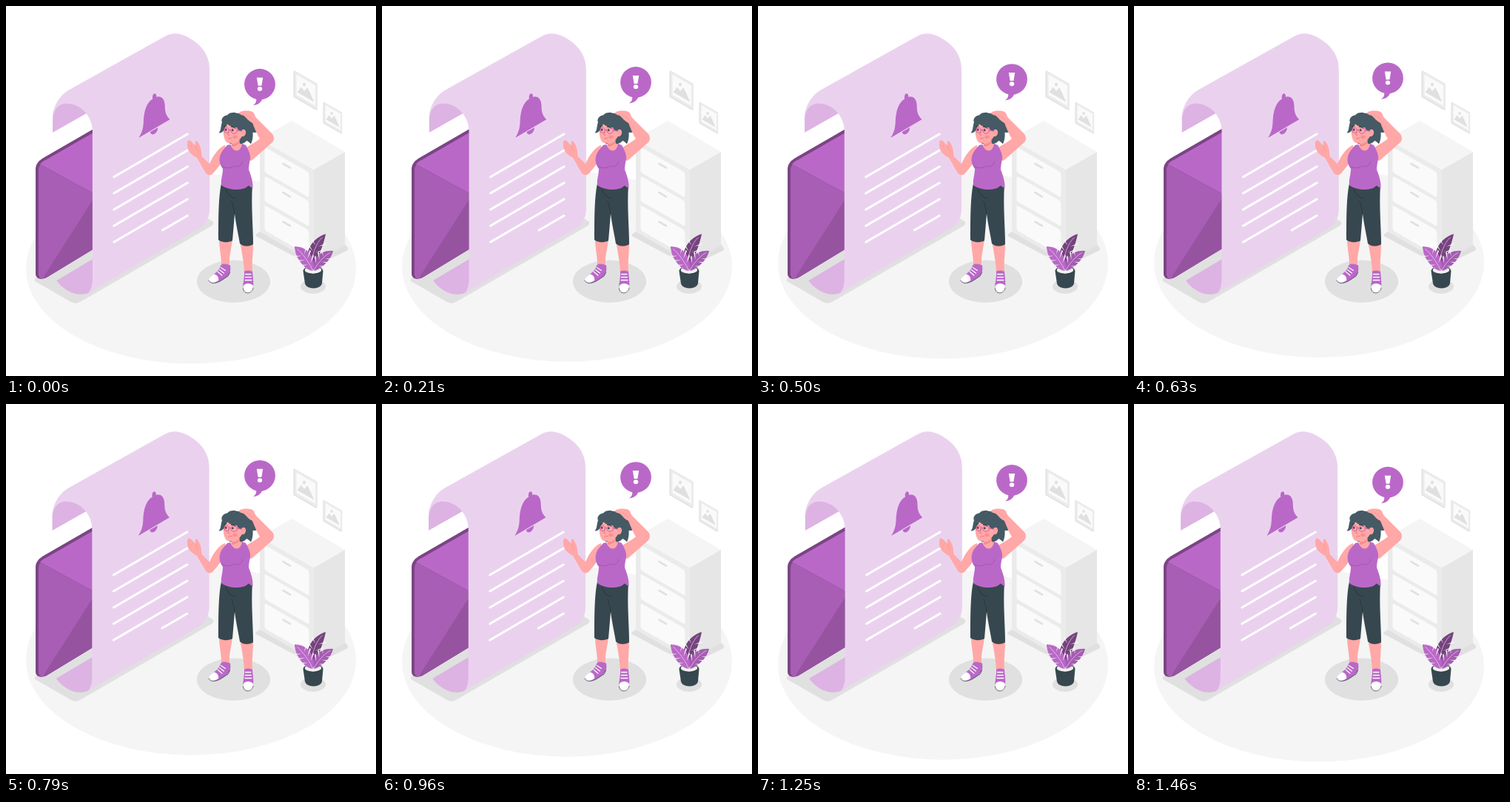
An HTML page with a canvas for the animation above (1.5 s loop, 500 by 500 pixels).

```html
<!DOCTYPE html>
<html lang="en">
<head>
<meta charset="utf-8">
<title>Notification</title>
<style>
  html, body { margin: 0; width: 100%; height: 100%; overflow: hidden; background: #fff; }
  canvas { display: block; width: 500px; height: 500px; }
</style>
</head>
<body>
<canvas id="stage"></canvas>
<script>
const canvas = document.getElementById('stage');
const ctx = canvas.getContext('2d');
const ratio = window.devicePixelRatio || 1;
canvas.width = canvas.height = 500 * ratio;

const LOOP = 1500, STEPS = 36;
const PURPLE = '#ba68c8', DARK = '#37474f', HAIR = '#455a64', SKIN = '#ffa8a7';
const SHADE = '#e0e0e0', FLOOR = '#f5f5f5';

const fill = (color, d) => {
  ctx.fillStyle = color;
  ctx.fill(new Path2D(d));
};
const stroke = (color, width, d) => {
  ctx.strokeStyle = color;
  ctx.lineWidth = width;
  ctx.stroke(new Path2D(d));
};
const ellipse = (color, x, y, rx, ry = rx, turn = 0) => {
  ctx.fillStyle = color;
  ctx.beginPath();
  ctx.ellipse(x, y, rx, ry, turn, 0, Math.PI * 2);
  ctx.fill();
};
const shifted = (dx, dy, draw) => {
  ctx.save();
  ctx.translate(dx, dy);
  draw();
  ctx.restore();
};

// Horizontal shake, one stop for every tenth of the loop.
const SHAKE = [0, -1, 2, -4, 4, -4, 4, -4, 2, -1, 0];
const shakeAt = p => {
  const i = Math.min(9, Math.floor(p * 10));
  return SHAKE[i] + (SHAKE[i + 1] - SHAKE[i]) * (p * 10 - i);
};
const floatAt = p => -10 * (1 - Math.abs(1 - 2 * p));

function drawPicture(x, y, scale) {
  ctx.save();
  ctx.translate(x, y);
  ctx.scale(scale, scale);
  fill('#e0e0e0', 'M0,0 L1.6,-.6 L32,17 V52 L30.5,52.8 L0,35Z');
  fill('#ebebeb', 'M1.6,-.4 L32,17 V52 L1.6,34.5Z');
  fill('#fafafa', 'M4,4.5 L29.5,19.2 V47 L4,32.2Z');
  fill(SHADE, 'M5,28.5 L10.5,21.5 L14.5,27 L19,22 L28,41.8Z');
  ellipse(SHADE, 14.5, 18, 2.1, 2.5);
  ctx.restore();
}

function drawCabinet() {
  fill(SHADE, 'M337,309 L345,304 L458,322 L462,327 Q463,329 460,331 L421,350 Q416,352 411,350 L338,311Z');
  fill('#ebebeb', 'M343,180 L416,221 V347 L343,305Z');
  fill('#e6e6e6', 'M416,221 L458,197 V323 L416,347Z');
  fill('#f5f5f5', 'M343,180 L386,155 L458,197 L416,221Z');
  for (const y of [0, 39, 78.5]) {
    shifted(0, y, () => {
      fill('#fafafa', 'M349.5,193 Q349.5,190.5 352,192 L407,223.5 Q409.5,225 409.5,228 V256 Q409.5,259 407,257.5 L352,226 Q349.5,224.5 349.5,222Z');
      stroke(SHADE, 2.6, 'M374.5,213.2 L384,218.7');
    });
  }
}

function drawEnvelope() {
  fill(SHADE, 'M40,368 Q37,371 41,373 L88,400 Q94,403.5 100,400 L278,297 Q282,294 279,291 L268,284 L110,330Z');
  fill('#7b4584', 'M40,220 C40,214 44,209 50,205.4 L125,162.3 V324 L55,366.8 C47,371 40,368 40,362Z');
  fill('#a85eb4', 'M44,222 C44,216 48,211 54,208 L125,167.2 V324 L55,366.8 C49,370 44,368 44,362Z');
  fill(PURPLE, 'M46,214 C48,211 51,209 54,208 L125,167.2 V257 L116,252Z');
  fill('#9553a0', 'M50,367.5 L116,264 L125,258 V324.5 L57,365.5 Q54,367.5 50,367.5Z');
  stroke('#9553a0', .6, 'M46,214 L116,252');
}

function drawPaper() {
  fill('#ddb3e3', 'M63.2,171 V154 C63.2,138 72,131 83,131 C97,131 108,140 114,152 L109,145Z');
  fill('#ddb3e3', 'M68.5,371 L119,341 V383 L113,387 C99,394 80,387 68.5,371Z');
  fill('#ead2ee', 'M63.2,157 V151 C63.2,137 72,121 85,113.5 L214,41.5 C223,36 234,35.5 246,42 C264,52 275.3,66 275.3,86 V275 C275.3,285 270,296 261,301 L111,388 C115,384 117,377 117,368 V169 C117,150 102,131.7 82,131.7 C70,131.7 63.2,141 63.2,157Z');
  for (let y = 231; y <= 319; y += 22) stroke('#fff', 3, `M146,${y} L245.5,${y - 58}`);
  stroke('#fff', 3, 'M211.5,303 L245.5,283.3');
  shifted(-.6, 0, () => {
    fill(PURPLE, 'M180.3,178 C183,173 186,168 186.5,158 C187,143 190,131 199,125.5 C198,121 200,118 202,118.3 C204,119 204,121 204,123 C211,121 215.5,126 215.5,135 C215.5,145 218,149 222.3,153.3Z');
    fill(PURPLE, 'M195.5,170.3 L206,164.2 C206,168 204,171 201.5,172.8 C198.5,174.5 196,173 195.5,170.3Z');
  });
}

function drawShoes() {
  fill(PURPLE, 'M290.5,350 C294,347 300,349 303,350.5 C304,357 303,362 299,365.5 C293,370 286,375 279,374.5 C273,373 274,367 280,363 C286,359 289,355 290.5,350Z');
  fill('#fff', 'M281,362.3 C285,363 288,367 287,371 C283,374 279,375 276,373.5 C272,371 275,366 281,362.3Z');
  stroke(DARK, .8, 'M274,371 C276,376 284,375 290,371.5 L300,365 L302.5,360');
  stroke('#fff', 1.2, 'M286,359 L292,364 M288.5,356.5 L294.5,361 M290.5,353.5 L296.5,357.5');
  fill(PURPLE, 'M322,358.5 C325,357 330,357 333,359 C333.5,366 335,374 334,381 C333,389 322,390 320.5,383 C319.5,375 322.5,369 322,358.5Z');
  fill('#fff', 'M320.6,379 C322,374 331,374 334,378 C335,386 331,388 327,388 C322,388 320,384 320.6,379Z');
  stroke(DARK, .8, 'M320.5,382 C321,390 333,390 334,381');
  stroke('#fff', 1.3, 'M323.5,362.5 H331 M323.5,366.5 H331.5 M323,370.5 H332');
}

function drawHead() {
  fill(DARK, 'M299,182 L306,181 L306,186.5 C303,187 301,185.5 299,182Z');
  fill(SKIN, 'M304,180 L320,174 L320,190 C321,198 306,199 302,191 L305,187Z');
  fill('#f28f8f', 'M305,186 C310,187 315,184 319,178 C317,186 311,190 305,190Z');
  fill(HAIR, 'M312,150 C326,146 334,152 335,158 C336,163 338,167 341,169 C338,171.5 335,171 333.5,171 C334,177 333,182 331,186.5 C329,184 327,183 325,182 C323,185 320,186.5 316,186Z');
  fill(SKIN, 'M295,154 C293,164 293,174 295.5,180 C297,185 302,186.5 307,185 C315,183 320,177 321,170 L317,150Z');
  fill(HAIR, 'M287.5,171.5 C291,168 290,162 292,157 C290,154 293,148 299,147.5 C302,143 309,143.5 313,145 C323,144.5 331,149 333,156 C335,166 331,178 317,187 C321,181 320,176 319,170 C315,169 313,167 312,164 C307,164.5 302,162.5 299.5,159.5 C297,161 296,164 295,167 C293,170.5 290,172 287.5,171.5Z');
  ellipse(SKIN, 320.5, 171.5, 3.5, 4.8, .25);
  stroke('#f28f8f', .7, 'M319.5,173 Q320,169 322.5,169.5');
  ellipse('#f58f95', 309.5, 177, 3.2, 2.2);
  stroke('#c45ca6', .9, 'M294.8,168 a3.3,3.6 0 1 0 6.6,0 a3.3,3.6 0 1 0 -6.6,0 M303.8,168.5 a4.3,3.8 0 1 0 8.6,0 a4.3,3.8 0 1 0 -8.6,0 M301.4,167.5 Q302.5,166.3 303.8,167.5 M312.4,168 L319,169');
  ellipse('#263238', 297.2, 167.3, 1, 1.5);
  ellipse('#263238', 306.4, 167.7, 1, 1.5);
  stroke('#263238', .9, 'M294.8,163 L298,161.8 M304.5,163.3 Q307.5,162.7 310,165');
  stroke('#e0707b', .8, 'M301.5,169 L299.7,174 L302,174.5 M300.5,179.3 Q302.5,177.8 305,178.8');
}

function drawWoman() {
  ellipse(SHADE, 307.5, 372.2, 49.5, 28.6);
  fill(SKIN, 'M288,314 C288,328 291,337 291,349 C293,353 300,353 302,350 C301,338 305,327 306,314Z');
  fill(SKIN, 'M316,318 C319,334 321,345 322,359 C324,362 331,362 333,359 C332,346 334,334 334,320Z');
  drawShoes();
  fill(DARK, 'M291,240 C287,258 287,290 287,316 C292,320 301,320 306,317 L309,281 C311,296 314,309 316,321 C321,326 330,325 334,322 C334,300 331,270 333,242Z');
  stroke('#263238', .8, 'M297,247 C299,255 304,259 310,260 M309,281 C308,273 306,268 305,264');

  // Reaching arm, then the arm raised over the head.
  fill(SKIN, 'M245,184 C246,180 250,181 252,185 L256,189 C255,183 257,181 258.5,183 C262,188 264,192 264.5,203 L275,213.5 C279,204 286,192 296,188 L300,203 C291,211 285,221 279,227 C275,230 271,228 269,224 L258,205 C250,201 246,196 245,190Z');
  stroke('#f28f8f', .7, 'M256,189 Q257,194 260,196');
  fill(SKIN, 'M303,188 L320,187 C326,190 330,195 330,203 L310,212Z');
  drawHead();
  fill(SKIN, 'M316,143.5 C320,141 328,141 333,143 C336,145 336,148 338,151 L360,173 C363.5,178 362,183 358,186 L333,208 C329,212 323,204 323,192 C330,188 337,184 343,179.5 C339,173 336,166 333,158 C328,156 325,151 321,148 C316,147 313,145 316,143.5Z');
  stroke('#f28f8f', .7, 'M326,148 Q330,149 333,153');

  fill(PURPLE, 'M303,187 C307,198 317,199 319,186 L324,188 C327,194 331,200 330,207 C329,212 328,216 328,221 C331,229 334,237 333.5,246.5 L327.5,242.5 C322,250 301,250 291,242 C290,235 293,228 293,220 C287,213 287,203 293,195 L299,188Z');
  stroke('#95539f', .8, 'M293,217 C299,220 305,219 308,216 M309,217 C315,218 319,214 320,210');
}

function drawLeaf(color, tip, base, bend, width) {
  const dx = tip[0] - base[0], dy = tip[1] - base[1];
  const length = Math.hypot(dx, dy);
  const spine = t => 3 * t * (1 - t) * bend;
  ctx.save();
  ctx.translate(...base);
  ctx.rotate(Math.atan2(dy, dx));
  fill(color, `M0,0 C${length * .2},${bend - width} ${length * .7},${bend - width} ${length},0 C${length * .75},${bend + width} ${length * .25},${bend + width} 0,0Z`);
  for (const t of [.3, .48, .66]) {
    const x = length * t, y = spine(t);
    for (const side of [-1, 1]) {
      fill(FLOOR, `M${x - 2},${y + side * 2} L${x + 3},${y + side * width} L${x + 5.5},${y + side * width}Z`);
    }
  }
  stroke('#fff', .5, `M0,0 C${length * .2},${bend} ${length * .7},${bend} ${length * .88},${spine(.88)}`);
  ctx.restore();
}

function drawPlant() {
  ellipse(SHADE, 415, 379, 17, 9.7);
  fill(DARK, 'M401.5,358 C401.5,349.5 428.5,349.5 428.5,358 L427,375 C425,383.5 406,383.5 404,375Z');
  ellipse('#f0f0f0', 415, 357, 11.3, 5.3);
  fill('#263238', 'M404,357.5 C407,363 423,363 426,357.5 C425,364 407,365 404,357.5Z');
  drawLeaf('#75427e', [432, 308], [414, 355], -8, 10.5);
  drawLeaf('#a55cb2', [442, 331], [416, 358], -4, 10);
  drawLeaf(PURPLE, [390, 325], [414.5, 358], 3, 11.5);
}

function drawBubble() {
  fill(PURPLE, 'M347,123 C346,129 342,134 334,134.5 C337.5,132 339,129 338,124Z');
  ellipse(PURPLE, 343, 106, 20.9);
  fill('#fff', 'M338.8,97 H347.2 L345.4,108 H340.6Z');
  ellipse('#fff', 343, 112.2, 3.2, 2.9);
}

function render(time) {
  // The picture holds for each of the equal steps of the loop.
  const step = Math.floor((time % LOOP) / LOOP * STEPS + .1) % STEPS;
  const progress = (step + .5) / STEPS;
  const rise = floatAt(progress);
  ctx.setTransform(ratio, 0, 0, ratio, 0, 0);
  ctx.lineCap = ctx.lineJoin = 'round';
  ctx.fillStyle = '#fff';
  ctx.fillRect(0, 0, 500, 500);

  shifted(0, rise, () => ellipse(FLOOR, 250, 355, 223, 128.7));
  drawPicture(388.5, 88, 1);
  drawPicture(428.5, 130.5, .8);
  drawCabinet();
  drawPlant();
  drawEnvelope();
  shifted(shakeAt(progress), 0, drawPaper);
  drawWoman();
  shifted(0, rise, drawBubble);
}

const start = performance.now();
function tick() {
  render(performance.now() - start);
  requestAnimationFrame(tick);
}
tick();
</script>
</body>
</html>
```
